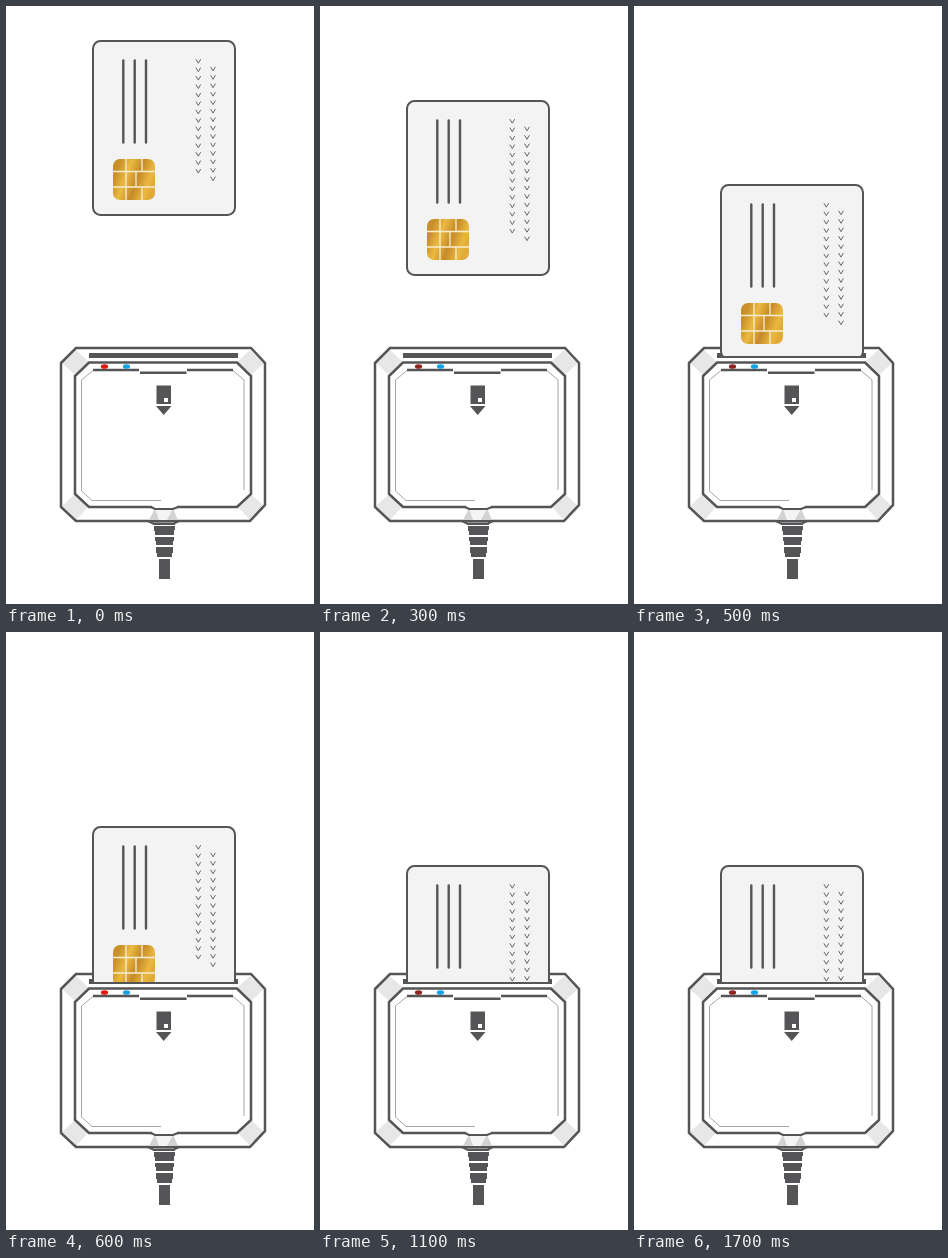
Write an HTML page that moves like this. It is 308x598 px and loops after 1800 ms.

```html
<!DOCTYPE html>
<html lang="en">
<head>
<meta charset="utf-8">
<title>Card reader</title>
<style>
  html, body { margin: 0; width: 100%; height: 100%; overflow: hidden; background: #fff; }
  svg { display: block; width: 100vw; height: 100vh; }
</style>
</head>
<body>
<svg viewBox="0 0 308 598" fill="none" stroke="#555557">
  <defs>
    <linearGradient id="gold" x1="0" y1="0.15" x2="1" y2="0.5">
      <stop offset="0" stop-color="#c98f2b"/>
      <stop offset="0.12" stop-color="#c98f2b"/>
      <stop offset="0.36" stop-color="#ebba41"/>
      <stop offset="0.62" stop-color="#c58b29"/>
      <stop offset="0.88" stop-color="#eab840"/>
      <stop offset="1" stop-color="#e0ab38"/>
    </linearGradient>
    <clipPath id="aboveSlot"><path d="M0 0H308V350H0z"/></clipPath>
  </defs>

  <!-- reader -->
  <g stroke="none" fill="#e7e7e7">
    <path d="M56 357L70 344L83 356L69 369z"/>
    <path d="M258 357L244 344L231 356L245 369z"/>
    <path d="M56 500L69 488L82 501L70 514z"/>
    <path d="M258 500L245 488L232 501L244 514z"/>
  </g>
  <path d="M55 357L70 342H245L259 357V499L244 515H70L55 501z" stroke-width="2.5"/>
  <path d="M146 501H83L69 488V370L83 356.5H231L245 370V488L231 501H171" stroke-width="2.5"/>
  <path d="M143 514L149 503H167L172 514z" fill="#e4e4e4" stroke="none"/>
  <path d="M149 503H167L161 514H153z" fill="#f4f4f4" stroke="none"/>
  <path d="M149 503L143 514H153zM167 503L172 514H161z" fill="#d3d3d3" stroke="none"/>
  <path d="M145 501L149 503H167L172 501M142 515L147 517.5H168L173 515" stroke-width="2.2"/>
  <path d="M155 494.5H86L75.5 485V374L87 364.5M227 364.5L238 374V484" stroke="#a5a5a5" stroke-width="1"/>
  <path d="M87 364H133M134 366.8H180.500M181 364H227" stroke-width="2.6"/>
  <path d="M83 349.5H232" stroke-width="5"/>
  <g stroke="none" fill="#555557">
    <path d="M150.500 379.500H165V398H150.500zM150 400H165.500L157.700 409z"/>
    <path d="M158 392H162V396H158z" fill="#fff"/>
    <path d="M147 517H169V519H147zM148 520H169V524H168V529H149V525H148z"/>
    <path d="M149 531H168V535H167V539H150V535H149z"/>
    <path d="M150 541H167V547H166V551H151V547H150z"/>
    <path d="M153 553H164V573H153z"/>
  </g>
  <g stroke="none">
    <ellipse id="red" cx="98.500" cy="360.500" rx="3.600" ry="2.300"/>
    <ellipse id="blue" cx="120.500" cy="360.500" rx="3.600" ry="2.300"/>
  </g>

  <!-- card -->
  <g clip-path="url(#aboveSlot)">
    <g id="card">
      <rect x="87" y="35" width="142" height="174" rx="7.500" fill="#f3f3f3" stroke-width="2"/>
      <path d="M117.300 54.500V136.500M128.700 54.500V136.500M140 54.500V136.500" stroke-width="2.400" stroke-linecap="round"/>
      <path id="marks" stroke="#666" stroke-width="1"/>
      <rect x="107" y="153" width="42" height="41" rx="7" fill="url(#gold)" stroke="none"/>
      <path d="M107 165.500H149M107 181H149M120 153V194M136 153V165.500M136 181V194M130 165.500V181" stroke="#f8edcf" stroke-width="1.300"/>
    </g>
  </g>
</svg>
<script>
  const STEP = 100, LOOP = 1800;
  // card travel per step: quick start, long settle
  const travel = [0, 3, 16, 60, 120, 144, 160, 175, 186, 193, 197, 199];
  const el = id => document.getElementById(id);
  const card = el('card'), red = el('red'), blue = el('blue');

  const column = (x, y) => Array.from({ length: 14 }, (_, i) =>
    `M${x - 2.4} ${y + i * 8.45}l2.4 4l2.4 -4`).join('');
  el('marks').setAttribute('d', column(192.3, 53.2) + column(207, 60.8));

  function draw(ms) {
    const n = Math.floor((ms % LOOP) / STEP);
    const odd = n % 2 === 1;
    const y = travel[Math.min(n, travel.length - 1)];
    card.setAttribute('transform', `translate(0 ${y})`);
    red.setAttribute('fill', odd ? '#8e2420' : '#e3170d');
    blue.setAttribute('fill', odd ? '#0fa2ea' : '#1b9fe0');
  }

  const start = performance.now();
  function tick(now) {
    draw(Math.max(0, now - start));
    requestAnimationFrame(tick);
  }
  draw(0);
  requestAnimationFrame(tick);
</script>
</body>
</html>
```
